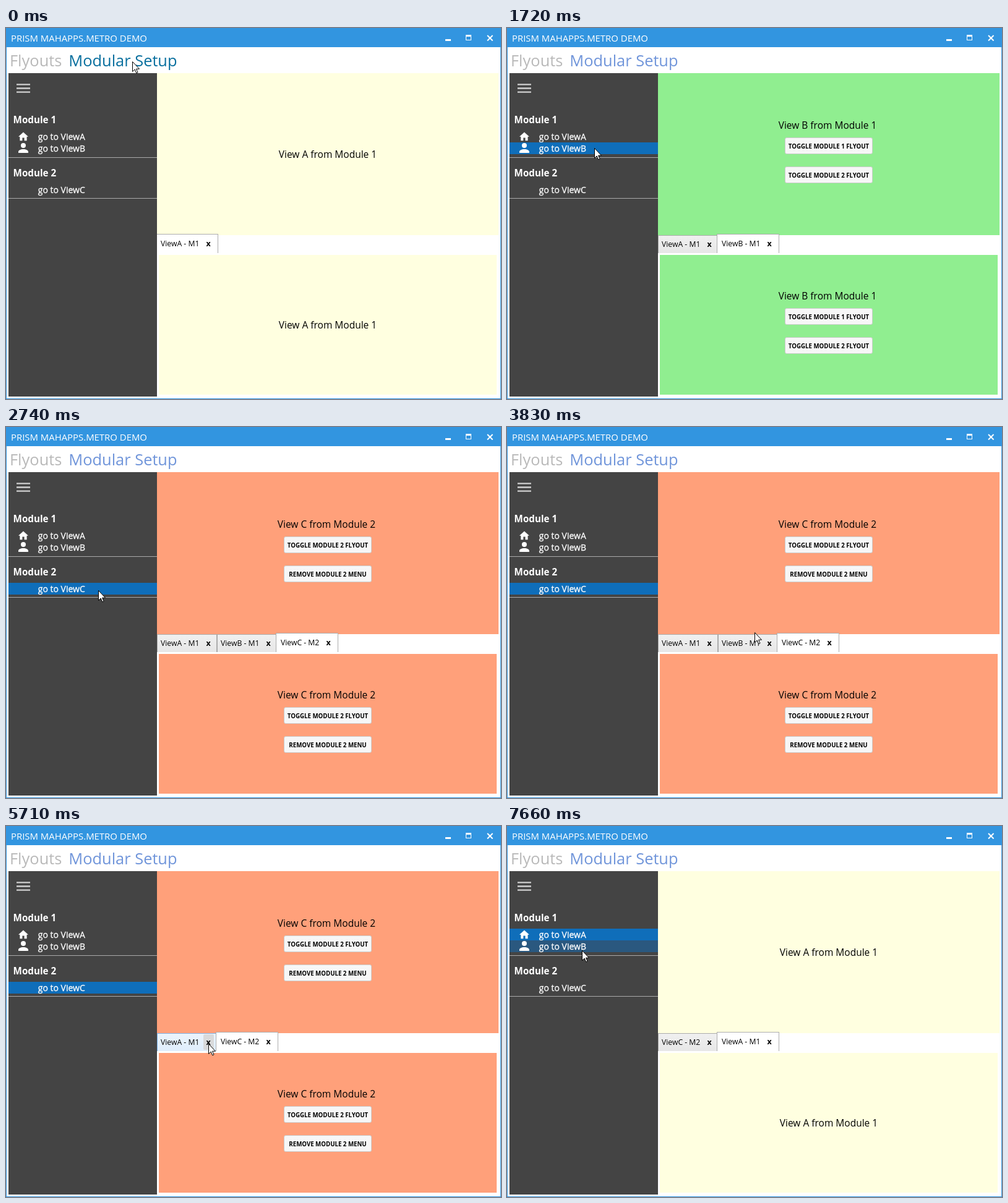
Write an HTML page that moves like this. It is 800x600 px and loops after 8 s.

```html
<!DOCTYPE html>
<html lang="en">
<head>
<meta charset="utf-8">
<title>Modular setup demo</title>
<style>
  html, body { margin: 0; width: 100%; height: 100%; overflow: hidden; background: #fff; }
  svg { display: block; width: 800px; height: 600px; font-family: "Open Sans", "Noto Sans", sans-serif; }
  text { white-space: pre; }
  .title { font-size: 14.9px; fill: #fff; }
  .page { font-size: 25.4px; }
  .group { font-size: 15.2px; font-weight: 700; fill: #fff; }
  .item { font-size: 14px; fill: #fff; stroke: #fff; stroke-width: .3px; }
  .view { font-size: 15.5px; text-anchor: middle; }
  .button { font-size: 9.7px; font-weight: 700; text-anchor: middle; }
  .tab { font-size: 12.2px; }
  .close { font-size: 12.5px; font-weight: 700; text-anchor: middle; }
</style>
</head>
<body>
<svg viewBox="0 0 800 600">
  <defs>
    <linearGradient id="idle" x2="0" y2="1"><stop stop-color="#f0f0f0"/><stop offset="1" stop-color="#e5e5e5"/></linearGradient>
    <linearGradient id="over" x2="0" y2="1"><stop stop-color="#ecf4fc"/><stop offset="1" stop-color="#dcecfc"/></linearGradient>
    <clipPath id="strip"><rect x="244" y="330" width="556" height="34"/></clipPath>
  </defs>
  <rect x=".5" y=".5" width="799" height="599" fill="#fff" stroke="#3295e0"/>
  <rect width="800" height="31" fill="#3295e0"/>
  <text class="title" x="8" y="22">PRISM MAHAPPS.METRO DEMO</text>
  <rect x="710" y="18" width="9" height="3" fill="#fff"/>
  <path d="M743 11h9v9h-9zM744 14v5h7v-5z" fill="#fff" fill-rule="evenodd"/>
  <path d="M778 12l8.5 8.5M786.5 12l-8.5 8.5" stroke="#fff" stroke-width="2"/>
  <text class="page" x="6" y="62" fill="#b9b9b9">Flyouts</text>
  <rect x="4" y="73" width="240" height="523" fill="#444"/>
  <path d="M17 91.4h22m-22 6.1h22m-22 6.1h22" stroke="#d0d0d0" stroke-width="2.4"/>
  <g id="scene"></g>
  <circle id="click" r="12" fill="#d8c800" fill-opacity=".7"/>
  <path id="cursor" d="M.5 .5V16.5L4.2 13L6.7 18.8L9 17.8L6.6 12.2H11.5Z" fill="#fff" stroke="#000"/>
</svg>
<script>
const LOOP = 8000;
const TICK = 80;
const PRESS = 70; // a click shows this long, then takes effect

const START = { x: 204, y: 54 };
const STOPS = [
  { x: 141, y: 194, leave: 630, arrive: 1350 },
  { x: 149, y: 264, leave: 1890, arrive: 2580 },
  { x: 400, y: 356, leave: 2980, arrive: 3600 },
  { x: 400, y: 332, leave: 3670, arrive: 3830 },
  { x: 423, y: 349, leave: 3910, arrive: 4550 },
  { x: 327, y: 352, leave: 5020, arrive: 5710 },
  { x: 114, y: 150, leave: 6020, arrive: 6640 },
  { x: 118, y: 170, leave: 6730, arrive: 6870 },
  { x: 121, y: 201, leave: 7200, arrive: 7450 }
];

const CLICKS = [
  { at: 550 },
  { at: 1650, go: "B" },
  { at: 2660, go: "C" },
  { at: 4870, close: "B" },
  { at: 5870, close: "A" },
  { at: 7040, go: "A" }
];

const VIEWS = {
  A: { module: 1, color: "#ffffe0", buttons: [] },
  B: { module: 1, color: "#90ee90", buttons: ["TOGGLE MODULE 1 FLYOUT", "TOGGLE MODULE 2 FLYOUT"] },
  C: { module: 2, color: "#ffa07a", buttons: ["TOGGLE MODULE 2 FLYOUT", "REMOVE MODULE 2 MENU"] }
};

const ICONS = {
  A: `<path transform="translate(18.4 166.2) scale(.8)" fill="#fff" d="M10 20V14H14V20H19V12H22L12 3L2 12H5V20Z"/>`,
  B: `<path transform="translate(16 182)" fill="#fff" d="M12 4a4 4 0 0 1 0 8a4 4 0 0 1 0-8M12 14C16.4 14 20 15.8 20 18V20H4V18C4 15.8 7.6 14 12 14Z"/>`,
  C: ""
};

const byId = id => document.getElementById(id);
const text = (cls, x, y, str, fill) =>
  `<text class="${cls}" x="${x}" y="${y}"${fill ? ` fill="${fill}"` : ""}>${str}</text>`;
const rect = (x, y, w, h, fill, more = "") =>
  `<rect x="${x}" y="${y}" width="${w}" height="${h}" fill="${fill}" ${more}/>`;
const inside = (p, x, y, w, h) => p.x >= x && p.x < x + w && p.y >= y && p.y < y + h;
const ease = u => u * u * (3 - 2 * u);

function pointerAt(t) {
  let p = START;
  for (const stop of STOPS) {
    if (t < stop.leave) break;
    const span = stop.arrive - stop.leave;
    const last = Math.round(span / TICK);
    const step = Math.min(last, Math.floor((t - stop.leave) / span * last + 1e-6));
    const u = ease((step + 1) / (last + 1));
    p = { x: p.x + (stop.x - p.x) * u, y: p.y + (stop.y - p.y) * u };
  }
  return { x: Math.round(p.x), y: Math.round(p.y) };
}

function stateAt(t) {
  const state = { open: ["A"], shown: "A", chosen: "" };
  for (const { at, go, close } of CLICKS) {
    if (t < at + PRESS) break;
    if (close) state.open = state.open.filter(name => name !== close);
    if (go) {
      if (!state.open.includes(go)) state.open.push(go);
      state.shown = state.chosen = go;
    }
  }
  return state;
}

function menu(chosen, p) {
  let out = "", base = 154;
  for (const module of [1, 2]) {
    const names = Object.keys(VIEWS).filter(name => VIEWS[name].module === module);
    out += text("group", 11.6, base, "Module " + module);
    names.forEach((name, i) => {
      const y = base + 12 + 19 * i;
      const fill = name === chosen ? "#0f6eba" : inside(p, 4, y, 240, 19) ? "#2a587f" : "none";
      out += rect(4, y, 240, 19, fill) + ICONS[name] + text("item", 51.8, y + 15, "go to View" + name);
    });
    const line = base + 15 + 20 * names.length;
    out += rect(4, line, 240, 1, "#aaa");
    base = line + 31;
  }
  return out;
}

function panel(name, x, y, w, h) {
  const view = VIEWS[name];
  const mid = y + h / 2;
  const full = view.buttons.length > 0;
  const base = Math.round(full ? mid - 41 : mid + 6);
  let out = rect(x, y, w, h, view.color) +
    text("view", full ? 518 : 520, base, `View ${name} from Module ${view.module}`);
  view.buttons.forEach((label, i) => {
    const top = base + 14.5 + i * 47;
    out += rect(449.5, top, 141, 26, "#f7f7f7", 'rx="2.5" stroke="#ccc"') +
      text("button", 520, top + 17.2, label);
  });
  return out;
}

function tab(name, i, active, p) {
  const x = 244 + 97 * i;
  const over = !active && inside(p, x, 335, 97, 30);
  const look = over ? "over" : "idle";
  const box = active
    ? rect(x - 1.5, 333.5, 100, 36, "#fff", 'stroke="#acacac"')
    : rect(x + 0.5, 335.5, 96, 34, `url(#${look})`, `stroke="${over ? "#7eb4ea" : "#acacac"}"`);
  const hot = inside(p, x + 75, 337, 17, 25) ? rect(x + 75, 337, 17, 25, "#d9dadb", 'rx="2"') : "";
  const y = active ? 353 : 354;
  return box + hot + text("tab", x + 6, y, `View${name} - M${VIEWS[name].module}`) +
    text("close", x + 83, y, "x");
}

// The shown tab goes last, as it overlaps its neighbours.
function tabs(open, shown, p) {
  const order = [...open].sort((a, b) => (a === shown) - (b === shown));
  return `<g clip-path="url(#strip)">` +
    order.map(name => tab(name, open.indexOf(name), name === shown, p)).join("") + "</g>";
}

function sceneAt(t, p) {
  const { open, shown, chosen } = stateAt(t);
  const link = inside(p, 100, 36, 177, 36) ? "#086f9e" : "#7095da";
  return text("page", 101.3, 62, "Modular Setup", link) + menu(chosen, p) +
    panel(shown, 244, 73, 552, 262) +
    tabs(open, shown, p) +
    panel(shown, 247, 367, 546, 226);
}

const scene = byId("scene"), click = byId("click"), cursor = byId("cursor");
let last = "";

function draw(t) {
  const p = pointerAt(t);
  const html = sceneAt(t, p);
  if (html !== last) scene.innerHTML = last = html;
  const place = `translate(${p.x} ${p.y})`;
  cursor.setAttribute("transform", place);
  click.setAttribute("transform", place);
  const pressed = CLICKS.some(({ at }) => t >= at && t < at + PRESS);
  click.setAttribute("visibility", pressed ? "visible" : "hidden");
}

const begin = performance.now();
function tick() {
  draw((performance.now() - begin) % LOOP);
  requestAnimationFrame(tick);
}
tick();
</script>
</body>
</html>
```
